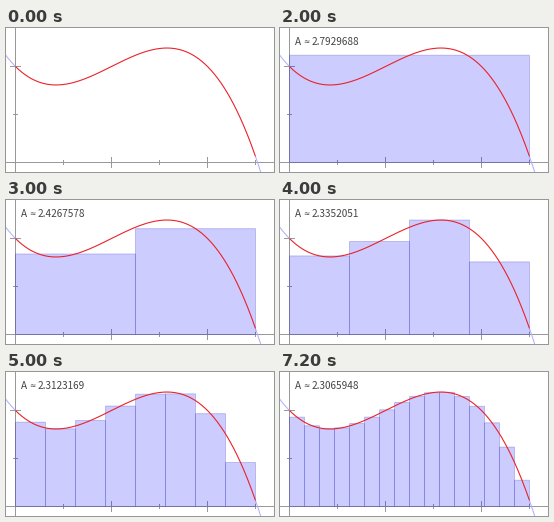
These frames come from a looping animation (268x144 px, 8 s). A matplotlib script:

```python
import numpy as np
import matplotlib.pyplot as plt
from matplotlib.animation import FuncAnimation
from matplotlib.patches import Rectangle

W, H, DPI = 268, 144, 100
X0, Y0, UNIT = 9.5, 134.5, 96      # origin and scale in pixels
END = 2.5                          # integration runs from 0 to END
PX = 72 / DPI                      # one pixel in points
COUNTS = [0, 0, 1, 2, 4, 8, 16, 16]  # rectangles shown in each second

GREY = (0.6, 0.6, 0.6)
FILL = (0, 0, 1, 0.2)
EDGE = (0.2, 0.2, 0.75, 0.25)
TAIL = (0.68, 0.68, 1)
RED = (0.92, 0.13, 0.16)


def f(x):
    return 1 - x * (x - 1) * (x - 2) / 2


def to_px(x, y):
    return X0 + UNIT * x, Y0 - UNIT * y


fig = plt.figure(figsize=(W / DPI, H / DPI), dpi=DPI, facecolor="white")
ax = fig.add_axes([0, 0, 1, 1])
ax.set_xlim(0, W)
ax.set_ylim(H, 0)
ax.axis("off")


def line(xs, ys, color, width=1, z=1):
    # coordinates already sit on pixel centres, so snapping stays off
    ax.plot(xs, ys, color=color, lw=width * PX, zorder=z,
            solid_capstyle="butt", snap=False)


def curve(a, b, color, width, z):
    x = np.linspace(a, b, 300)
    line(*to_px(x, f(x)), color, width, z)


# axes with long ticks at whole units and short ones at halves
line([0, W], [Y0, Y0], GREY)
line([X0, X0], [0, H], GREY)
for k in range(1, 6):
    size = 2.5 if k % 2 else 5.5
    x, y = to_px(k / 2, k / 2)
    line([x, x], [Y0 - size, Y0 + size], GREY)
    if k < 3:
        line([X0 - size, X0 + size], [y, y], GREY)

curve(-0.12, 0, TAIL, 1, 4)
curve(END, 2.62, TAIL, 1, 4)
curve(0, END, RED, 1.1, 5)


def label(x, y, text, size, font):
    return ax.text(x, y, text, fontsize=size * PX, family=font,
                   color="#444444", va="baseline", zorder=6)


texts = [label(14.8, 17, "A", 10, "Noto Sans CJK JP"),
         label(23, 16.3, "≈", 7.5, "DejaVu Sans"),
         label(31.6, 17, "", 10, "Noto Sans CJK JP")]
bars = []


def draw(i):
    while bars:
        bars.pop().remove()
    n = COUNTS[i]
    total = 0
    for k in range(n):
        step = END / n
        height = f((k + 0.5) * step)
        total += height * step
        bar = Rectangle(to_px(k * step, 0), step * UNIT, -height * UNIT,
                        facecolor=FILL, edgecolor=EDGE, lw=PX, zorder=3,
                        snap=False)
        bars.append(ax.add_patch(bar))
    texts[2].set_text(f"{total:.7f}")
    for t in texts:
        t.set_visible(n > 0)
    return bars + texts


anim = FuncAnimation(fig, draw, frames=len(COUNTS), interval=1000,
                     init_func=lambda: draw(0), repeat=True, repeat_delay=0)
plt.show()
```
